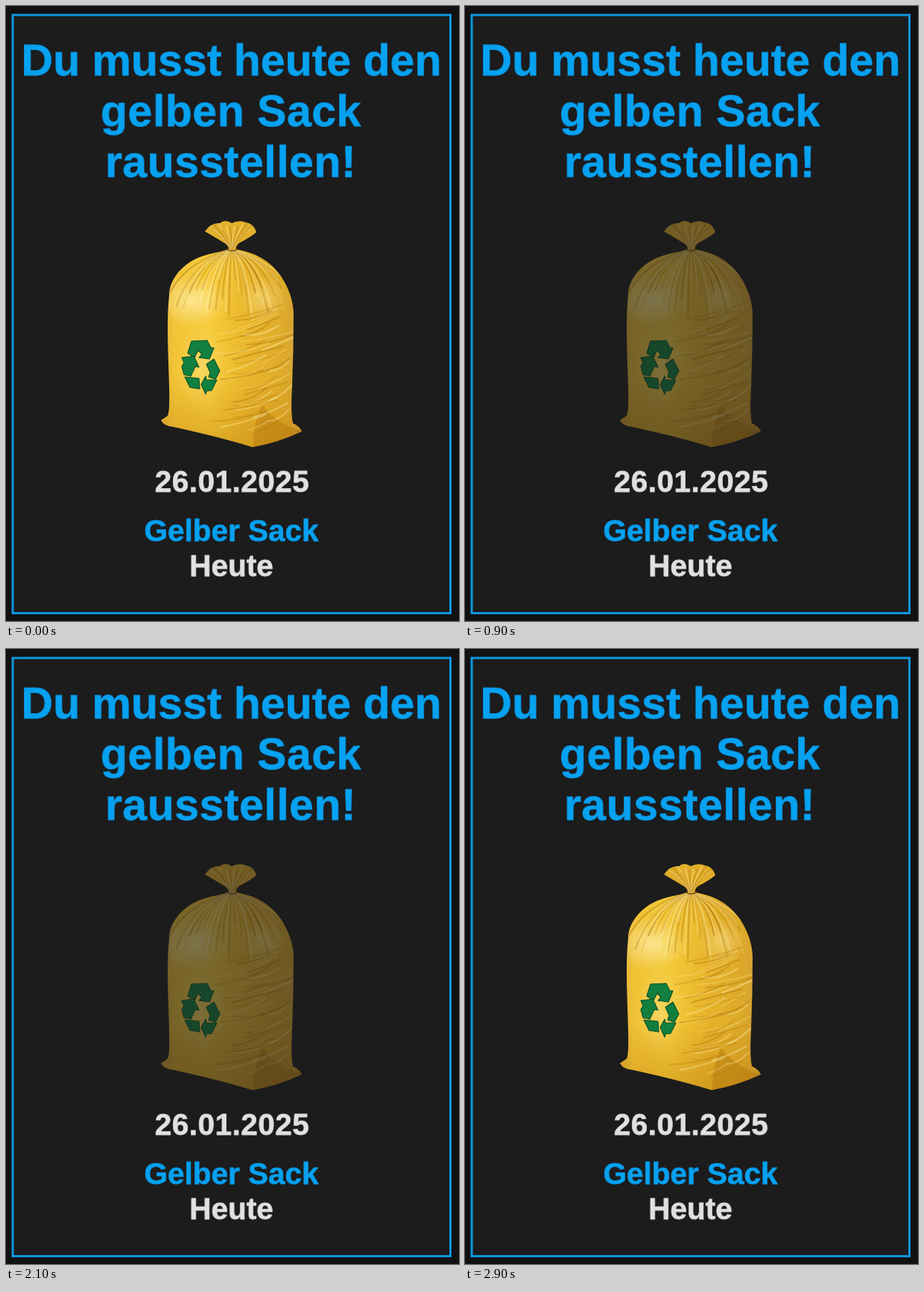
These frames come from a looping animation (608x824 px, 3 s). An HTML page:

```html
<!DOCTYPE html>
<html lang="de">
<head>
<meta charset="utf-8">
<title>Gelber Sack</title>
<style>
  html, body { margin: 0; width: 100%; height: 100%; overflow: hidden; background: #111; }
  svg { display: block; }
  text {
    font: bold 40.5px "Liberation Sans", Arial, sans-serif;
    text-anchor: middle;
    stroke-width: .8;
    stroke-linejoin: round;
  }
  .title { font-size: 59px; }
  .loose { letter-spacing: .5px; }
  .blue { fill: #06a2f0; stroke: #0a8fdc; }
  .white { fill: #e1e1e1; stroke: #cfcfcf; }
</style>
</head>
<body>
<svg width="608" height="824" viewBox="0 0 608 824">
  <defs>
    <linearGradient id="side">
      <stop offset="0" stop-color="#e2b23a"/>
      <stop offset=".1" stop-color="#f2c436"/>
      <stop offset=".35" stop-color="#f6cb3a"/>
      <stop offset=".62" stop-color="#e9b62c"/>
      <stop offset=".86" stop-color="#dfab2a"/>
      <stop offset="1" stop-color="#d3a138"/>
    </linearGradient>
    <linearGradient id="shade" x2="0" y2="1">
      <stop offset=".65" stop-color="#b87808" stop-opacity="0"/>
      <stop offset="1" stop-color="#b87808" stop-opacity=".4"/>
    </linearGradient>
    <radialGradient id="glow">
      <stop offset="0" stop-color="#fff3b4" stop-opacity=".7"/>
      <stop offset="1" stop-color="#fff3b4" stop-opacity="0"/>
    </radialGradient>
    <filter id="soft"><feGaussianBlur stdDeviation=".7"/></filter>
    <path id="body" d="M299 326C283 331 262 333 247 343C232 353 219 369 219 388C215 425 218 470 219 510Q220 543 217 549L208 555Q212 563 225 564Q285 577 331 591Q365 585 397 570Q394 563 385 559Q382 546 384 510Q386 460 386 412Q385 386 369 362C352 338 331 330 308 326Z"/>
    <path id="knot" d="M299 329Q300 322 294 318Q279 309 267 302Q275 290 287 291Q294 285 303 291Q313 286 322 290Q332 291 336 303Q328 310 314 317Q307 321 309 329Z"/>
    <clipPath id="inside"><use href="#body"/></clipPath>
    <clipPath id="insideKnot"><use href="#knot"/></clipPath>
  </defs>

  <rect x="9" y="12" width="587.5" height="801.5" fill="#1c1c1c" stroke="#0d97de" stroke-width="3"/>

  <text class="title blue" x="302.5" y="93">Du musst heute den</text>
  <text class="title blue loose" x="302" y="161">gelben Sack</text>
  <text class="title blue loose" x="301.5" y="229">rausstellen!</text>

  <g id="bag">
    <use href="#knot" fill="#e3b02b"/>
    <g id="pleats" clip-path="url(#insideKnot)" fill="none"/>
    <use href="#body" fill="url(#side)"/>
    <g clip-path="url(#inside)" fill="none">
      <use href="#body" fill="url(#shade)"/>
      <path d="M332 592Q331 560 344 535Q365 562 400 570V592Z" fill="#a86a06" opacity=".35" filter="url(#soft)"/>
      <ellipse cx="250" cy="395" rx="48" ry="36" fill="url(#glow)"/>
      <ellipse cx="345" cy="392" rx="32" ry="30" fill="url(#glow)" opacity=".6"/>
      <ellipse cx="262" cy="484" rx="34" ry="60" fill="url(#glow)" opacity=".45"/>
      <g id="folds" filter="url(#soft)"/>
    </g>
    <path d="M296 326Q303 330 311 326" fill="none" stroke="#8d600f" stroke-width="2"/>
    <g fill="#128040" stroke="#0b5529" stroke-width="1.2" stroke-linejoin="round">
      <path d="M249 449L270 448L275 458L279 458L273 473L259 471L263 467L258 461L253 471L244 465Z"/>
      <path d="M236 471L252 469L259 484L254 483L248 496L239 494L236 483L239 478Z"/>
      <path d="M240 497L259 499L260 513L247 511Z"/>
      <path d="M269 480L279 473L287 489L281 500L272 497L274 491Z"/>
      <path d="M283 501L276 515L269 516L268 520L262 507L268 496L269 501Z"/>
    </g>
  </g>

  <text class="white loose" x="303.5" y="651">26.01.2025</text>
  <text class="blue" x="302.5" y="717">Gelber Sack</text>
  <text class="white" x="302.5" y="764">Heute</text>
</svg>
<script>
  const PERIOD = 3000, STEP = 100, MIN_OPACITY = 0.13;
  const bag = document.getElementById('bag');
  const LIGHT = '#ffefa8', DARK = '#a8700c';

  let seed = 11;
  const random = () => (seed = seed * 16807 % 2147483647) / 2147483647;
  const between = (a, b) => a + (b - a) * random();

  function crease(id, d, color, opacity, width) {
    const path = document.createElementNS('http://www.w3.org/2000/svg', 'path');
    const attrs = { d, stroke: color, opacity, 'stroke-width': width, 'stroke-linecap': 'round' };
    for (const name in attrs) path.setAttribute(name, attrs[name]);
    document.getElementById(id).append(path);
  }

  // Pleats above the tie
  for (let i = 0; i < 13; i++) {
    const x = 268 + i * 5.5;
    crease('pleats', `M303 326Q${303 + (x - 303) * 0.3} 312 ${x} ${between(289, 302)}`,
      i % 2 ? LIGHT : DARK, 0.45, 1.5);
  }

  // Folds fanning out below the tie
  for (let i = 0; i < 38; i++) {
    const x = 220 + i * 4.4, y = between(365, 415);
    crease('folds', `M303 326Q${303 + (x - 303) * 0.72} 341 ${x} ${y}`,
      i % 2 ? LIGHT : DARK, between(0.2, 0.5), between(1, 2.6));
  }

  // Slanted wrinkles on the right side
  for (let i = 0; i < 40; i++) {
    const y = 400 + i * 4, x = between(345, 386), length = between(25, 75);
    crease('folds', `M${x} ${y}q${-length / 2} ${between(8, 18)} ${-length} ${between(12, 22)}`,
      i % 2 ? LIGHT : DARK, between(0.2, 0.45), between(1, 2.6));
  }

  function draw() {
    const time = Math.floor(performance.now() % PERIOD / STEP) * STEP;
    const wave = (1 + Math.cos(2 * Math.PI * time / PERIOD)) / 2;
    bag.setAttribute('opacity', MIN_OPACITY + (1 - MIN_OPACITY) * wave);
    requestAnimationFrame(draw);
  }
  draw();
</script>
</body>
</html>
```
